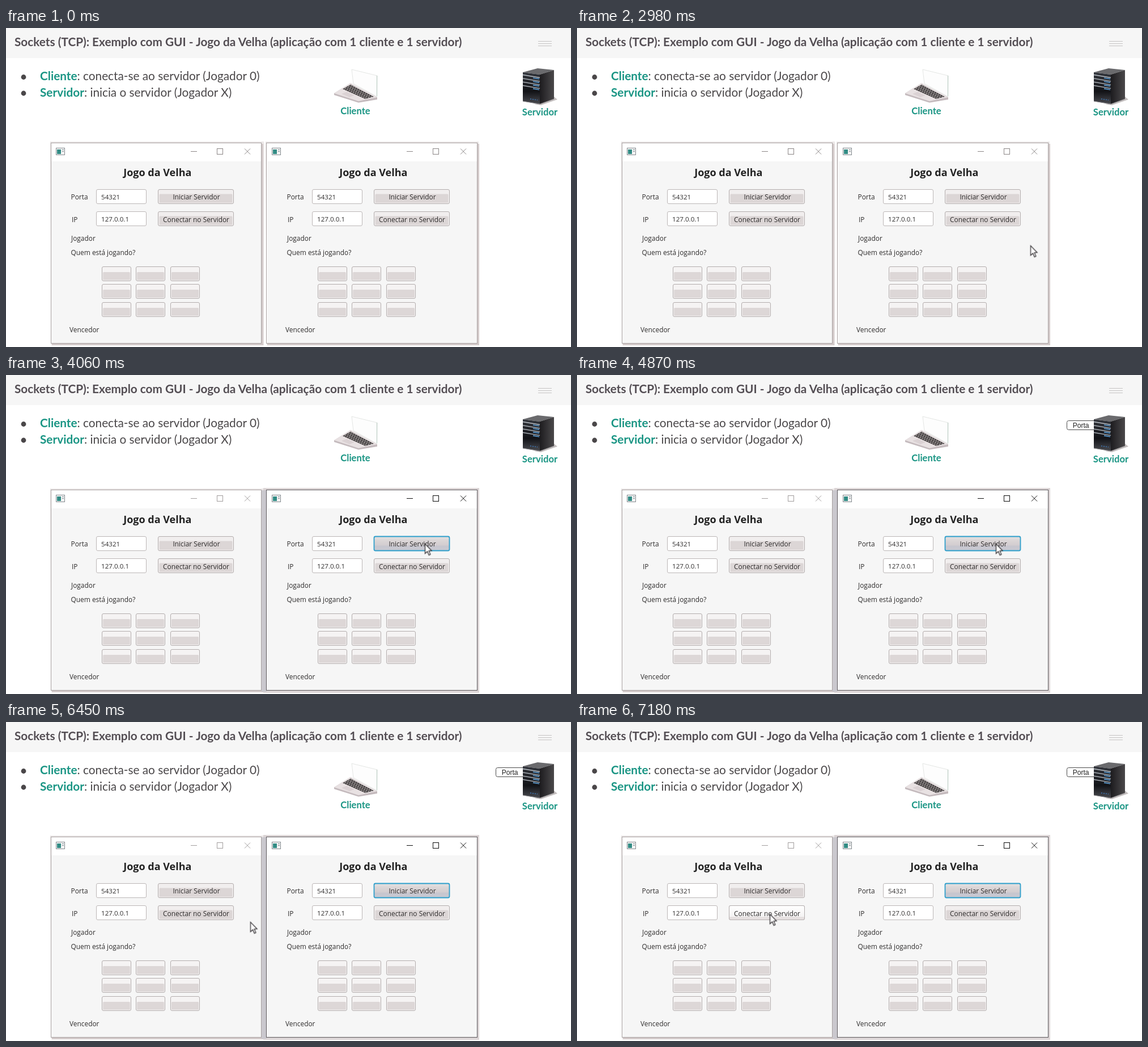
An HTML page that plays this animation: 997x562 px, repeating every 8 s.

```html
<!DOCTYPE html>
<html lang="pt">
<head>
<meta charset="utf-8">
<title>Jogo da Velha</title>
<style>
html, body { margin: 0; width: 100%; height: 100%; overflow: hidden; background: #fff; }
svg { display: block; width: 997px; height: 562px; }
.slide { font-family: Lato, sans-serif; font-size: 20.77px; fill: #4a4749; }
.title { font-weight: 700; fill: #534d53; }
.key { font-weight: 700; fill: #1a9584; }
.label { font-size: 16.62px; text-anchor: middle; }
.ui { font-family: "Open Sans", "Noto Sans", sans-serif; font-size: 11.9px; fill: #2f2d2d; }
.ui .head { font-size: 18px; font-weight: 700; fill: #222; }
.ui .num { font-size: 11.6px; }
.mid { text-anchor: middle; }
.tag text { font: 12.1px "Liberation Sans", Arial, sans-serif; fill: #222; }
.ctl { fill: none; stroke: currentColor; }
.btn { stroke: #b3adad; }

/* One shared 8 s clock; percentages are time / 8000 ms */
.cursor, .left, .right, .edge, .glow, .hover1, .hover2, .focus, .tag {
  animation: 8s step-end infinite;
}
.cursor { animation-name: move; }
.left { animation-name: dim; }
.right { animation-name: wake; }
.edge { animation-name: edge; }
.glow, .focus { animation-name: show; }
.hover1 { animation-name: hover1; }
.hover2 { animation-name: hover2; }
.tag { animation-name: fade; }

@keyframes move {
  0% { transform: translate(804px, 570px); }
  2.375% { transform: translate(804px, 549px); animation-timing-function: steps(6); }
  6.875% { transform: translate(796px, 452px); animation-timing-function: steps(5); }
  10.625% { transform: translate(799.5px, 420.5px); animation-timing-function: step-end; }
  37.25% { transform: translate(800.5px, 383.5px); animation-timing-function: steps(4); }
  40.25% { transform: translate(778px, 338px); animation-timing-function: steps(4); }
  43.25% { transform: translate(739.5px, 297.5px); animation-timing-function: step-end; }
  70% { transform: translate(734px, 298.5px); animation-timing-function: steps(6); }
  74.9375% { transform: translate(575px, 335px); animation-timing-function: steps(6); }
  79.875% { transform: translate(436.5px, 349.5px); animation-timing-function: step-end; }
  80.625% { transform: translate(431.5px, 352.5px); animation-timing-function: steps(6); }
  85.6% { transform: translate(381px, 354px); animation-timing-function: steps(5); }
  89.75%, 100% { transform: translate(340.5px, 338.5px); }
}
@keyframes dim { 0% { color: #8c8787; } 50.75%, 100% { color: #a39f9f; } }
@keyframes wake { 0% { color: #8c8787; } 50.75%, 100% { color: #111; } }
@keyframes edge { 0% { stroke: #a8a1a1; } 50.75%, 100% { stroke: #5c585c; } }
@keyframes show { 0% { opacity: 0; } 50.75%, 100% { opacity: 1; } }
@keyframes hover1 { 0% { opacity: 0; } 42.5% { opacity: 1; } 50.75%, 100% { opacity: 0; } }
@keyframes hover2 { 0% { opacity: 0; } 87.25%, 100% { opacity: 1; } }
@keyframes fade {
  0% { opacity: 0; }
  55.625% { opacity: .125; animation-timing-function: steps(7); }
  60.875%, 100% { opacity: 1; }
}
</style>
</head>
<body>
<svg viewBox="0 0 997 562">
  <defs>
    <linearGradient id="lit" x2="0" y2="1">
      <stop offset="0" stop-color="#fff"/><stop offset=".78" stop-color="#f5f3f3"/>
      <stop offset=".82" stop-color="#e2dcdc"/><stop offset="1" stop-color="#e9e4e4"/>
    </linearGradient>
    <linearGradient id="pressed" x2="0" y2="1">
      <stop offset="0" stop-color="#e6e2e2"/><stop offset=".3" stop-color="#dad5d6"/>
      <stop offset=".62" stop-color="#d3cdd0"/><stop offset=".66" stop-color="#c7c6ce"/>
      <stop offset="1" stop-color="#c9c9d2"/>
    </linearGradient>
    <linearGradient id="front" x2="0" y2="1">
      <stop offset="0" stop-color="#33363d"/><stop offset=".6" stop-color="#121317"/>
      <stop offset="1" stop-color="#4a4b50"/>
    </linearGradient>
    <linearGradient id="side" x2="1" y2="0">
      <stop offset="0" stop-color="#1d1c1f"/><stop offset="1" stop-color="#4b494b"/>
    </linearGradient>
    <pattern id="keys" width="4" height="3" patternUnits="userSpaceOnUse" patternTransform="rotate(25)">
      <rect width="4" height="3" fill="#a59f9f"/><rect width="3.1" height="2.2" fill="#383435"/>
    </pattern>
    <clipPath id="shot"><path d="M78 198H835V560H78Z"/></clipPath>

    <rect id="bar" x="268.5" y="284.5" width="133" height="25" rx="2.5"/>
    <g id="button">
      <use href="#bar" class="btn" fill="#f1eeee"/>
      <rect x="270.5" y="292.5" width="129" height="15.5" rx="1.5" fill="#dcd6d6"/>
    </g>
    <text id="start" class="mid" x="336" y="301.5">Iniciar Servidor</text>
    <text id="join" class="mid" x="335.5" y="341.5">Conectar no Servidor</text>
    <g id="cell">
      <rect class="btn" x="169.5" y="420.5" width="51" height="25" rx="2.5" fill="#f5f3f3"/>
      <rect x="171" y="430" width="48" height="14" rx="1.5" fill="#ddd7d7"/>
    </g>
    <g id="row">
      <use href="#cell"/><use href="#cell" x="60"/><use href="#cell" x="121"/>
    </g>
    <rect id="field" x="159.5" y="284.5" width="88" height="25" rx="2.5" fill="#fff" stroke="#bcb7b7"/>

    <g id="pane" class="ui">
      <path d="M79 202H451V555H79Z" fill="#fff"/>
      <path d="M80 235H450V555H80Z" fill="#f6f6f6"/>
      <rect x="88.5" y="211.5" width="15" height="12" fill="#f4f4f4" stroke="#858b90"/>
      <path d="M90 214H97V222H90Z" fill="#338c85"/>
      <path d="M99 214.5H102M99 217.5H102" stroke="#77848c"/>
      <g class="ctl">
        <path d="M326 217.5H337M421 212.5L431 222.5M431 212.5L421 222.5"/>
        <rect x="372.5" y="212.5" width="10" height="10"/>
      </g>
      <text class="head mid" x="267.3" y="261">Jogo da Velha</text>
      <text x="114.5" y="301.5">Porta</text>
      <text x="116" y="342">IP</text>
      <use href="#field"/><use href="#field" y="39"/>
      <text class="num" x="168" y="301.5">54321</text>
      <text class="num" x="168" y="341">127.0.0.1</text>
      <use href="#button"/><use href="#start"/>
      <use href="#button" y="39"/><use href="#join"/>
      <text x="115" y="374.5">Jogador</text>
      <text x="114.5" y="399.5">Quem está jogando?</text>
      <use href="#row"/><use href="#row" y="31"/><use href="#row" y="63"/>
      <text x="112" y="536">Vencedor</text>
    </g>
  </defs>

  <rect width="997" height="562" fill="#fff"/>
  <rect width="997" height="53" fill="#f6f6f6"/>
  <path d="M939 23.5H963M939 27.5H963M939 31.5H963" stroke="#c6c4c4"/>

  <g class="slide">
    <text class="title" x="15" y="32">Sockets (TCP): Exemplo com GUI - Jogo da Velha (aplicação com 1 cliente e 1 servidor)</text>
    <circle cx="31" cy="86.5" r="4.4"/>
    <circle cx="31" cy="115" r="4.4"/>
    <text x="60" y="92"><tspan class="key">Cliente</tspan>: conecta-se ao servidor (Jogador 0)</text>
    <text x="60" y="121"><tspan class="key">Servidor</tspan>: inicia o servidor (Jogador X)</text>
    <text class="key label" x="616.5" y="152">Cliente</text>
    <text class="key label" x="942" y="154">Servidor</text>
  </g>

  <!-- laptop -->
  <path d="M610 73L655 84L654.5 121L613 98Z" fill="#fdfdfd" stroke="#dde0de" stroke-width=".8"/>
  <path d="M654.5 84V120" stroke="#a9c0b4" stroke-width=".8"/>
  <path d="M579 115L608 97L655 122V126L622 131.5L579 118Z" fill="#c4babd"/>
  <path d="M579 115L608 97L655 122L622 129Z" fill="#e8e1e2"/>
  <path d="M594 107.5L608 99.5L649 121L634 125Z" fill="url(#keys)"/>
  <path d="M592 116L601 112.5L615 118.5L606 122Z" fill="#dbd2d4"/>

  <g class="tag">
    <rect x="864.5" y="80.5" width="53" height="16" rx="3" fill="#fff" stroke="#4a4a4a"/>
    <text x="874.7" y="93">Porta</text>
  </g>

  <!-- server -->
  <path d="M932 134L967 121L973 126L944 136Z" fill="#c4bfbf"/>
  <path d="M912 78L938 71L967 74L942 82Z" fill="#6a6a6d"/>
  <path d="M942 82L967 74V125L942 134Z" fill="url(#side)"/>
  <path d="M912 78L942 82V134L912 129Z" fill="url(#front)"/>
  <g id="shelves" fill="none">
    <g id="shelf">
      <path d="M912 82.5L942 87.5" stroke="#b9bfc6" stroke-width="1.3"/>
      <path d="M930 88L941 89.8" stroke="#5d9fd6" stroke-width="1.6"/>
    </g>
    <use href="#shelf" y="6.3"/><use href="#shelf" y="12.6"/><use href="#shelf" y="18.9"/>
    <path d="M925 125L938 127" stroke="#3e79b8" stroke-width="1.5" stroke-dasharray="2 2"/>
    <path d="M912 129L942 134L967 125" stroke="#8a898c"/>
  </g>

  <!-- window shadows -->
  <path d="M78 200H455V559H80Z" fill="#ebe7e7"/>
  <path d="M451 204H454V559H81V555H451Z" fill="#d4cbcb"/>
  <path d="M458 200H834V559H460Z" fill="#ebe7e7"/>
  <path d="M832 204H835V559H461V555H832Z" fill="#d4cbcb"/>
  <g class="glow">
    <path d="M454 199H835V560H454Z" fill="#dcd5d6"/>
    <path d="M451 203H460V558H451Z" fill="#cac8ce"/>
  </g>

  <use href="#pane" class="left"/>
  <rect x="79.5" y="202.5" width="371" height="353" fill="none" stroke="#a8a1a1"/>
  <use href="#pane" x="381" class="right"/>
  <rect class="edge" x="459.5" y="202.5" width="372" height="353" fill="none"/>

  <g class="ui">
    <g class="hover2">
      <use href="#bar" class="btn" y="39" fill="url(#lit)"/><use href="#join"/>
    </g>
    <g transform="translate(381)">
      <g class="hover1">
        <use href="#bar" class="btn" fill="url(#lit)"/><use href="#start"/>
      </g>
      <g class="focus">
        <use href="#bar" fill="url(#pressed)" stroke="#2f9fcb" stroke-width="1.8"/><use href="#start"/>
      </g>
    </g>
  </g>

  <g clip-path="url(#shot)">
    <path class="cursor" d="M0 0V17L4 13.4L6.8 19.8L9.4 18.6L6.7 12.3L11.5 12Z" fill="#fff" stroke="#353235" stroke-width="1.3"/>
  </g>
</svg>
</body>
</html>
```
